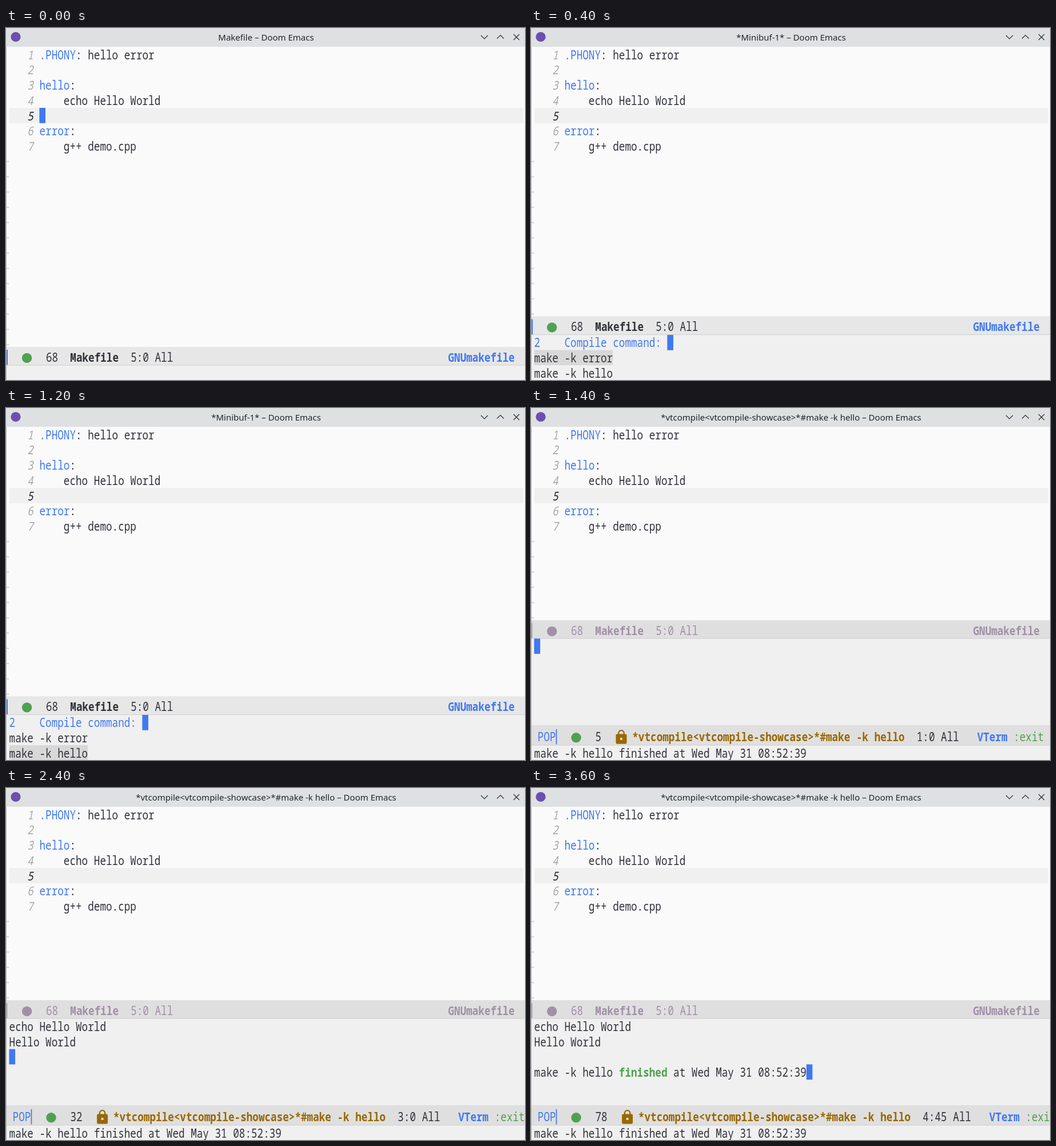
An HTML page with a canvas for the animation above (4000 ms loop, 908 by 617 pixels).

```html
<!DOCTYPE html>
<html lang="en">
<head>
<meta charset="utf-8">
<title>Makefile</title>
<style>
  html, body { margin: 0; width: 100%; height: 100%; overflow: hidden; background: #fafafa; }
  canvas { display: block; }
</style>
</head>
<body>
<canvas id="stage" width="908" height="617"></canvas>
<script>
const ctx = document.getElementById('stage').getContext('2d');
const W = 908, H = 617, LOOP = 4000;
const LEFT = 5.6, COL = 10.585, ROW = 26.75, TOP = 33;
// The editor face is tall and narrow: one aspect for the whole cell grid.
const ASPECT = 1.2, SIZE = COL / 0.6;
const MONO = '"Noto Sans Mono", "DejaVu Sans Mono", monospace';
const C = {
  bg: '#fafafa', alt: '#f0f0f0', title: '#dee0e2', bar: '#e7e7e7', idle: '#dfdfdf',
  edge: '#cfcfcf', pick: '#d8d8d8', fg: '#30323a', num: '#a6a8ab', now: '#1b2229',
  blue: '#4078f2', green: '#50a14f', brown: '#986801', mauve: '#a28fa8'
};
const BUFFER = '*vtcompile<vtcompile-showcase>*#make -k hello';
const DONE_AT = ' at Wed May 31 08:52:39';

function rect(x, y, w, h, color) {
  ctx.fillStyle = color;
  ctx.fillRect(x, y, w, h);
}

function dot(x, y, r, color) {
  ctx.fillStyle = color;
  ctx.beginPath();
  ctx.arc(x, y, r, 0, Math.PI * 2);
  ctx.fill();
}

function stroke(points, color, width) {
  ctx.strokeStyle = color;
  ctx.lineWidth = width;
  ctx.beginPath();
  points.forEach(([x, y], i) => i ? ctx.lineTo(x, y) : ctx.moveTo(x, y));
  ctx.stroke();
}

// Draws a string on the cell grid and returns the x after it.
function put(str, x, top, color = C.fg, style = '') {
  ctx.font = `${style} ${SIZE}px ${MONO}`;
  ctx.fillStyle = color;
  ctx.textAlign = 'left';
  ctx.save();
  ctx.translate(0, top + 21.6);
  ctx.scale(1, ASPECT);
  for (const ch of str) {
    if (ch !== ' ') ctx.fillText(ch, x, 0);
    x += COL;
  }
  ctx.restore();
  return x;
}

function cursor(col, top) {
  rect(LEFT + col * COL - 0.1, top, COL, ROW, C.blue);
}

function titleBar(name) {
  rect(0, 0, W, TOP, C.title);
  dot(17, 15.5, 8.6, '#6c4fae');
  ctx.font = '15px "Noto Sans", sans-serif';
  ctx.textAlign = 'center';
  ctx.fillStyle = '#232629';
  ctx.fillText(name + ' – Doom Emacs', 455, 21.5);
  const ink = '#2b2e31';
  stroke([[831, 13], [837, 19], [843, 13]], ink, 1.2);
  stroke([[859, 18.5], [865, 12.5], [871, 18.5]], ink, 1.2);
  stroke([[888, 11], [898, 21]], ink, 1.2);
  stroke([[898, 11], [888, 21]], ink, 1.2);
}

function editor(bottom, focused) {
  rect(0, TOP, W, bottom - TOP, C.bg);
  rect(6, TOP + 4 * ROW, 899, ROW, C.alt);
  const lines = [
    ['.PHONY', ': hello error'], [], ['hello', ':'], ['', '    echo Hello World'],
    [], ['error', ':'], ['', '    g++ demo.cpp']
  ];
  lines.forEach(([key = '', rest = ''], i) => {
    const top = TOP + i * ROW;
    put(String(i + 1), LEFT + 3 * COL, top, i === 4 ? C.now : C.num, 'italic');
    put(rest, put(key, LEFT + 5 * COL, top, C.blue), top);
  });
  if (focused) cursor(5, TOP + 4 * ROW);
  for (let y = 234; y < bottom; y += ROW) {
    stroke([[1, y + 0.5], [2.3, y - 0.5], [3.8, y + 0.6], [5.2, y - 0.4]], '#a8abae', 1);
  }
}

function fileBar(top, active) {
  const ink = active ? C.fg : C.mauve;
  rect(0, top, W, 32, active ? C.bar : C.idle);
  rect(0, top + 31.5, W, 1, C.edge);
  rect(1, top + 5, active ? 2 : 1.2, 26.5, active ? C.blue : C.mauve);
  dot(36.6, top + 19.4, 8.7, active ? C.green : C.mauve);
  let x = put('68  ', 70, top + 4, ink);
  x = put('Makefile', x, top + 4, ink, 'bold');
  put('  5:0 All', x, top + 4, ink);
  put('GNUmakefile', 773.5, top + 4, active ? C.blue : C.mauve, 'bold');
}

function lock(x) {
  ctx.fillStyle = C.brown;
  ctx.beginPath();
  ctx.roundRect(x, 571.5, 19, 17.3, 2.4);
  ctx.fill();
  ctx.strokeStyle = C.brown;
  ctx.lineWidth = 2.3;
  ctx.beginPath();
  ctx.moveTo(x + 4.8, 572);
  ctx.arc(x + 9.5, 569.8, 4.7, Math.PI, 0);
  ctx.lineTo(x + 14.2, 572);
  ctx.stroke();
  dot(x + 9.5, 580, 2.2, C.idle);
}

function termBar(size, pos) {
  const top = 562.6;
  rect(0, 556, W, 35, C.idle);
  rect(0, 590.5, W, 1, C.edge);
  put('POP', 11.6, top, C.blue);
  rect(43.6, 563, 1.7, 26.5, C.blue);
  dot(79, 577.8, 8.7, C.green);
  let x = put(size, 112.4, top);
  lock(x + 25.5);
  x = put(BUFFER, x + 54.3, top, C.brown, 'bold');
  x = put(`  ${pos} All   `, x, top);
  x = put('VTerm', x, top, C.blue, 'bold');
  put(' :exit', x, top, C.green);
}

function editing(keys) {
  titleBar('Makefile');
  editor(559, true);
  fileBar(559, true);
  put(keys, LEFT, 591);
}

function choosing(pick) {
  titleBar('*Minibuf-1*');
  editor(505.5, false);
  fileBar(505.5, true);
  put('2    Compile command:', LEFT, 537.7, C.blue);
  cursor(22, 538);
  ['error', 'hello'].forEach((target, i) => {
    const top = 564.5 + i * 26.5;
    if (i === pick) rect(LEFT, top, 13 * COL, 26.5, C.pick);
    put('make -k ' + target, LEFT, top);
  });
}

function running(step) {
  titleBar(BUFFER);
  editor(372, false);
  fileBar(372, false);
  const rowTop = n => 404.2 + n * ROW;
  if (step > 0) {
    put('echo Hello World', LEFT, rowTop(0));
    put('Hello World', LEFT, rowTop(1));
  }
  if (step > 1) {
    let x = put('make -k hello ', LEFT, rowTop(3));
    x = put('finished', x, rowTop(3), C.green, 'bold');
    put(DONE_AT, x, rowTop(3));
  }
  cursor(...[[0, rowTop(0)], [0, rowTop(2)], [45, rowTop(3)]][step]);
  termBar(['5', '32', '78'][step], ['1:0', '3:0', '4:45'][step]);
  put('make -k hello finished' + DONE_AT, LEFT, 591);
}

const scenes = [
  [0, editing, ''], [300, editing, 'SPC p-'],
  [400, choosing, 0], [1200, choosing, 1],
  [1400, running, 0], [1500, running, 1], [3000, running, 2]
];

function draw(now) {
  const t = now % LOOP;
  const [, scene, arg] = scenes.findLast(([start]) => t >= start);
  rect(0, 0, W, H, C.alt);
  scene(arg);
  rect(0, TOP, 1, H - TOP, '#b4b6b8');
}

const start = performance.now();
function tick() {
  draw(performance.now() - start);
  requestAnimationFrame(tick);
}
tick();
</script>
</body>
</html>
```
